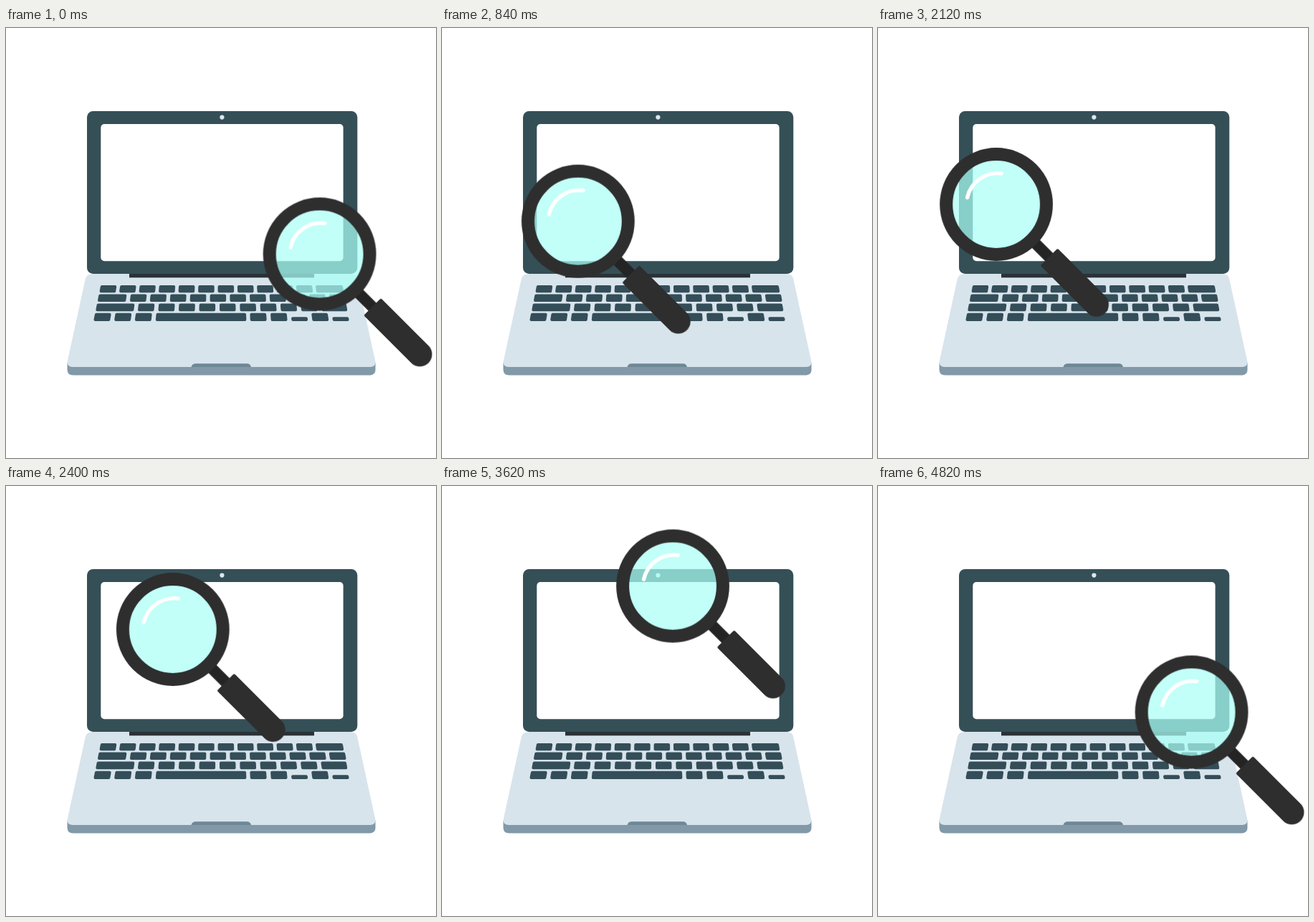
Recreate the animation shown at these times as an HTML page. Size 600x600 px, loop 5420 ms.

```html
<!DOCTYPE html>
<html lang="en">
<head>
<meta charset="utf-8">
<title>Laptop and magnifier</title>
<style>
  html, body { margin: 0; width: 100%; height: 100%; overflow: hidden; background: #fff; }
  svg { display: block; width: 100%; height: 100%; }
  #keys { fill: #344e59; stroke: #344e59; stroke-width: 4; stroke-linejoin: round; }
  #lens { animation: search 5420ms cubic-bezier(.5, 0, .5, 1) infinite; }
  /* three 1200 ms moves, each followed by a 600 ms rest */
  @keyframes search {
    0%, 88.5609%, 100% { transform: translate(437.6px, 315.5px); }
    22.1402%, 33.2103% { transform: translate(143px, 261px); }
    55.3506%, 66.4207% { transform: translate(322px, 139.5px); }
  }
</style>
</head>
<body>
<svg viewBox="0 0 600 600">
  <g id="laptop">
    <path fill="#8199a8" d="M85.5 467H515.5V477Q515.5 484.5 507 484.5H94Q85.5 484.5 85.5 477Z"/>
    <path fill="#d8e4ec" d="M122 343H480Q488.500 343 490 349L515.300 465Q516.500 473 508 473H93Q84.500 473 85.700 465L111 349Q113 343 122 343Z"/>
    <path fill="#6f8896" d="M258.500 473Q259.500 468.300 265 468.300H336Q341 468.300 342 473Z"/>
    <rect x="172" y="342" width="258" height="6.300" fill="#2b3236"/>
    <rect x="113" y="116" width="377.300" height="227" rx="8.500" fill="#354f57"/>
    <rect x="132.300" y="134" width="338.300" height="191.200" rx="5" fill="#fff"/>
    <circle cx="301.400" cy="124.600" r="3.100" fill="#dde8ee"/>
    <g id="keys"></g>
  </g>
  <g id="lens">
    <circle r="62" fill="#aafff6" fill-opacity=".72"/>
    <path d="M-40.500 -9.500A43 43 0 0 1 7.200 -43" fill="none" stroke="#fff" stroke-width="5.400" stroke-linecap="round"/>
    <g transform="rotate(45)">
      <rect x="76" y="-7.800" width="32" height="15.600" fill="#242424"/>
      <path fill="#2e2e2e" d="M106 -17H198A16.800 17 0 0 1 198 17H106Q104 17 104 15V-15Q104 -17 106 -17Z"/>
    </g>
    <circle r="69.900" fill="none" stroke="#2e2e2e" stroke-width="18"/>
  </g>
</svg>
<script>
  const keys = document.getElementById('keys');

  // Key sides lean towards the centre line at x = 301.
  function key(left, right, top, bottom) {
    const r = 2, mid = (top + bottom) / 2;
    const point = (x, y) => {
      const px = 301 + (x - 301) * (1 + 0.0011 * (y - mid));
      return px.toFixed(2) + ',' + y;
    };
    const l = left + r, rt = right - r, t = top + r, b = bottom - r;
    const shape = document.createElementNS('http://www.w3.org/2000/svg', 'polygon');
    shape.setAttribute('points', [point(l, t), point(rt, t), point(rt, b), point(l, b)].join(' '));
    keys.append(shape);
  }

  function run(x, count, pitch, top, bottom, width = 22.5) {
    for (let i = 0; i < count; i++) key(x + i * pitch, x + i * pitch + width, top, bottom);
  }

  run(131.2, 11, 27.4, 359, 369.3);
  key(432.5, 470.6, 359, 369.3);

  key(128.6, 167.8, 371.5, 382);
  run(173.4, 11, 27.8, 371.5, 382);

  key(126, 178.8, 384.5, 395.3);
  run(184.4, 9, 28.4, 384.5, 395.3);
  key(440, 475.6, 384.5, 395.3);

  run(123.2, 3, 28.6, 397.8, 409, 22.8);
  key(209.2, 335.2, 397.8, 409);
  run(340.6, 2, 28.8, 397.8, 409, 22.8);
  key(426.8, 449.6, 397.8, 409);
  run(398.2, 2, 57.4, 403.2, 409, 22.8);
</script>
</body>
</html>
```
